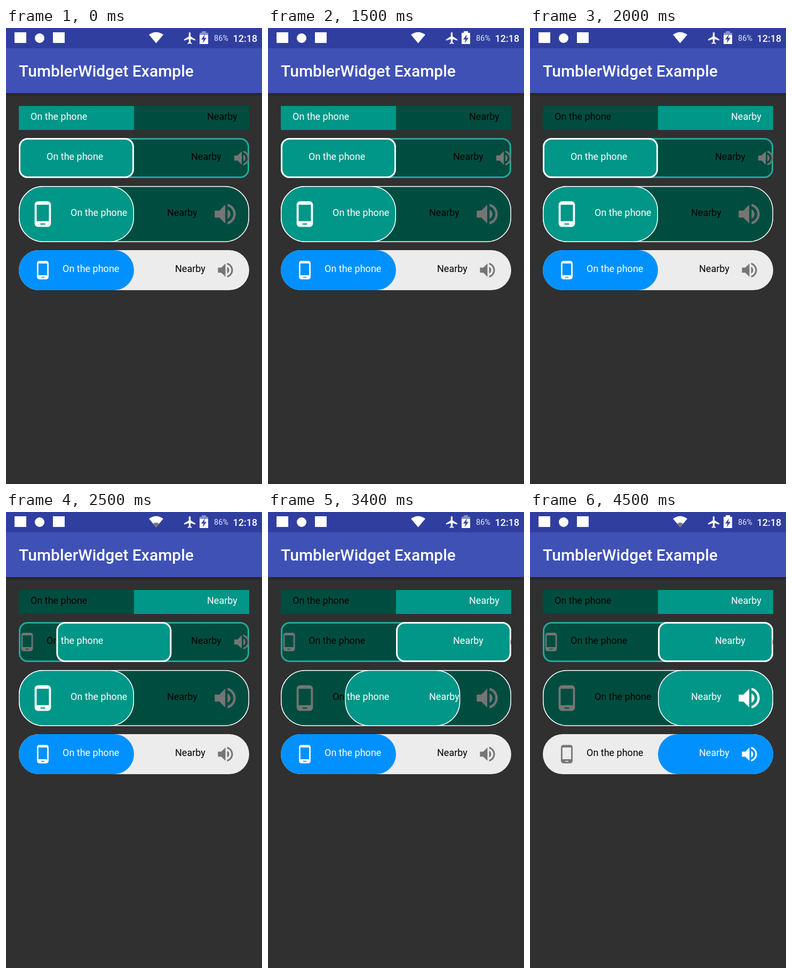
Write an HTML page with a canvas that moves like this. It is 480 by 854 pixels and loops after 5100 ms.

```html
<!DOCTYPE html>
<html lang="en">
<head>
<meta charset="utf-8">
<title>TumblerWidget Example</title>
<style>
  html, body { margin: 0; width: 100%; height: 100%; overflow: hidden; background: #303030; }
  canvas { display: block; }
</style>
</head>
<body>
<canvas id="stage" width="480" height="854"></canvas>
<script>
const ctx = document.getElementById('stage').getContext('2d');
const LOOP = 5100, STEP = 100, SLIDE = 300;
const LEFT = 24, WIDTH = 432, HALF = WIDTH / 2;

// Icons on a 24 unit grid
const PHONE = new Path2D('M16 1H8C6.34 1 5 2.34 5 4v16c0 1.66 1.34 3 3 3h8c1.66 0 3-1.34 3-3V4c0-1.66-1.34-3-3-3zm-2 20h-4v-1h4v1zm3.25-3H6.75V4h10.5v14z');
const SPEAKER = new Path2D('M3 9v6h4l5 5V4L7 9H3zm13.5 3c0-1.77-1.02-3.29-2.5-4.03v8.05c1.48-.73 2.5-2.25 2.5-4.02zM14 3.23v2.06c2.89.86 5 3.54 5 6.71s-2.11 5.85-5 6.71v2.06c4.01-.91 7-4.49 7-8.77s-2.99-7.86-7-8.77z');
const PLANE = new Path2D('M21 16v-2l-8-5V3.5c0-.83-.67-1.5-1.5-1.5S10 2.67 10 3.5V9l-8 5v2l8-2.5V19l-2 1.5V22l3.5-1 3.5 1v-1.5L13 19v-5.5l8 2.5z');
const WIFI = new Path2D('M268 12.5Q281.500 3 295 12.500L281.500 28.500Z');
const WIFI_TIP = new Path2D('M276 22Q281.500 17.500 287 22L281.500 28.500Z');
const BOLT = new Path2D('M373 12L366 21.500H370.500L368.500 28.500L376 18.500H371.500Z');

const teal = { base: '#004d40', knob: '#009688' };
const switches = [
  { ...teal, y: 146, h: 45, r: 0, start: 1663.5, text: [46, 377] },
  { ...teal, y: 206, h: 75, r: 15, start: 2384, text: [76, 347], icons: [39.5, 442],
    line: 3, baseLine: '#26a69a', plainKnob: true },
  { ...teal, y: 296, h: 105, r: 45, start: 3239, text: [121, 302], icons: [69, 411],
    line: 1.5, baseLine: '#fff' },
  { base: '#ececec', knob: '#0091ff', y: 416, h: 75, r: 37.5, start: 4074,
    text: [106, 317], icons: [69, 411.5] }
];

const within = (t, spans) => spans.some(([a, b]) => t >= a && t < b);

function ease(t) {
  const p = Math.min(1, Math.max(0, t));
  return (1 - Math.cos(Math.PI * p)) / 2;
}

function rect(x, y, w, h, color) {
  ctx.fillStyle = color;
  ctx.fillRect(x, y, w, h);
}

function label(text, x, y, size, color, weight = 400) {
  ctx.font = `${weight} ${size}px Roboto, sans-serif`;
  ctx.fillStyle = color;
  ctx.fillText(text, x, y);
}

function icon(path, cx, cy, scale, color) {
  ctx.save();
  ctx.translate(cx, cy);
  ctx.scale(scale, scale);
  ctx.translate(-12, -12);
  ctx.fillStyle = color;
  ctx.fill(path);
  ctx.restore();
}

function shape(x, y, w, h, r) {
  ctx.beginPath();
  ctx.roundRect(x, y, w, h, r);
}

function panel(s, x, w, fill, stroke) {
  const line = s.line || 0;
  shape(x + line / 2, s.y + line / 2, w - line, s.h - line, s.r);
  ctx.fillStyle = fill;
  ctx.fill();
  if (line) {
    ctx.lineWidth = line;
    ctx.strokeStyle = stroke;
    ctx.stroke();
  }
}

function content(s, textColor, iconColor) {
  const mid = s.y + s.h / 2;
  if (s.icons && iconColor) {
    const scale = s.h / 48;
    icon(PHONE, s.icons[0], mid, scale, iconColor);
    icon(SPEAKER, s.icons[1], mid, scale, iconColor);
  }
  const baseline = Math.floor(mid) + 4;
  label('On the phone', s.text[0], baseline, 18, textColor);
  label('Nearby', s.text[1], baseline, 18, textColor);
}

function drawSwitch(s, t) {
  const x = LEFT + HALF * ease((t - s.start) / SLIDE);
  ctx.save();
  ctx.beginPath();
  ctx.rect(LEFT, s.y, WIDTH, s.h);
  ctx.clip();
  panel(s, LEFT, WIDTH, s.base, s.baseLine);
  content(s, '#000', '#757575');
  panel(s, x, HALF, s.knob, '#fff');
  ctx.save();
  shape(x, s.y, HALF, s.h, s.r);
  ctx.clip();
  content(s, '#fff', s.plainKnob ? null : '#fff');
  ctx.restore();
  if (s.plainKnob) {
    // The speaker's edge stays visible beside the knob
    ctx.beginPath();
    ctx.rect(LEFT + WIDTH - 1.5, s.y, 2, s.h);
    ctx.clip();
    icon(SPEAKER, s.icons[1], s.y + s.h / 2, s.h / 48, '#757575');
  }
  ctx.restore();
}

function drawStatus(t) {
  const bar = '#303f9f', dim = '#8890c8';
  rect(0, 0, 480, 38, bar);
  rect(16, 8, 22, 20, '#fff');
  rect(88, 8, 22, 20, '#fff');
  ctx.beginPath();
  ctx.arc(63, 19, 9, 0, 2 * Math.PI);
  ctx.fill();

  ctx.fill(WIFI);
  if (within(t, [[2300, 2700], [4500, LOOP]])) {
    ctx.fillStyle = '#777';
    ctx.fill(WIFI_TIP);
  }
  icon(PLANE, 345, 19, 1.11, '#fff');

  const full = within(t, [[400, 900], [1400, 2000], [3000, 3300], [4000, LOOP]]);
  const top = full ? '#fff' : dim;
  rect(367, 6, 8, 3, top);
  rect(363, 9, 16, 4, top);
  rect(363, 13, 16, 17, '#fff');
  ctx.fillStyle = bar;
  ctx.fill(BOLT);

  label('86%', 390, 24, 14.5, '#e4e6f4');
  label('12:18', 425.5, 26, 18, '#fff', 500);
}

function draw(now) {
  const t = Math.floor((now % LOOP) / STEP) * STEP;
  rect(0, 0, 480, 854, '#303030');
  drawStatus(t);
  rect(0, 38, 480, 84, '#3f51b5');
  const shadow = ctx.createLinearGradient(0, 122, 0, 128);
  shadow.addColorStop(0, 'rgba(0,0,0,.28)');
  shadow.addColorStop(1, 'rgba(0,0,0,0)');
  rect(0, 122, 480, 6, shadow);
  label('TumblerWidget Example', 24, 91, 30, '#fff', 500);
  switches.forEach(s => drawSwitch(s, t));
}

let origin;
function tick(now) {
  origin ??= now;
  draw(now - origin);
  requestAnimationFrame(tick);
}
requestAnimationFrame(tick);
</script>
</body>
</html>
```
